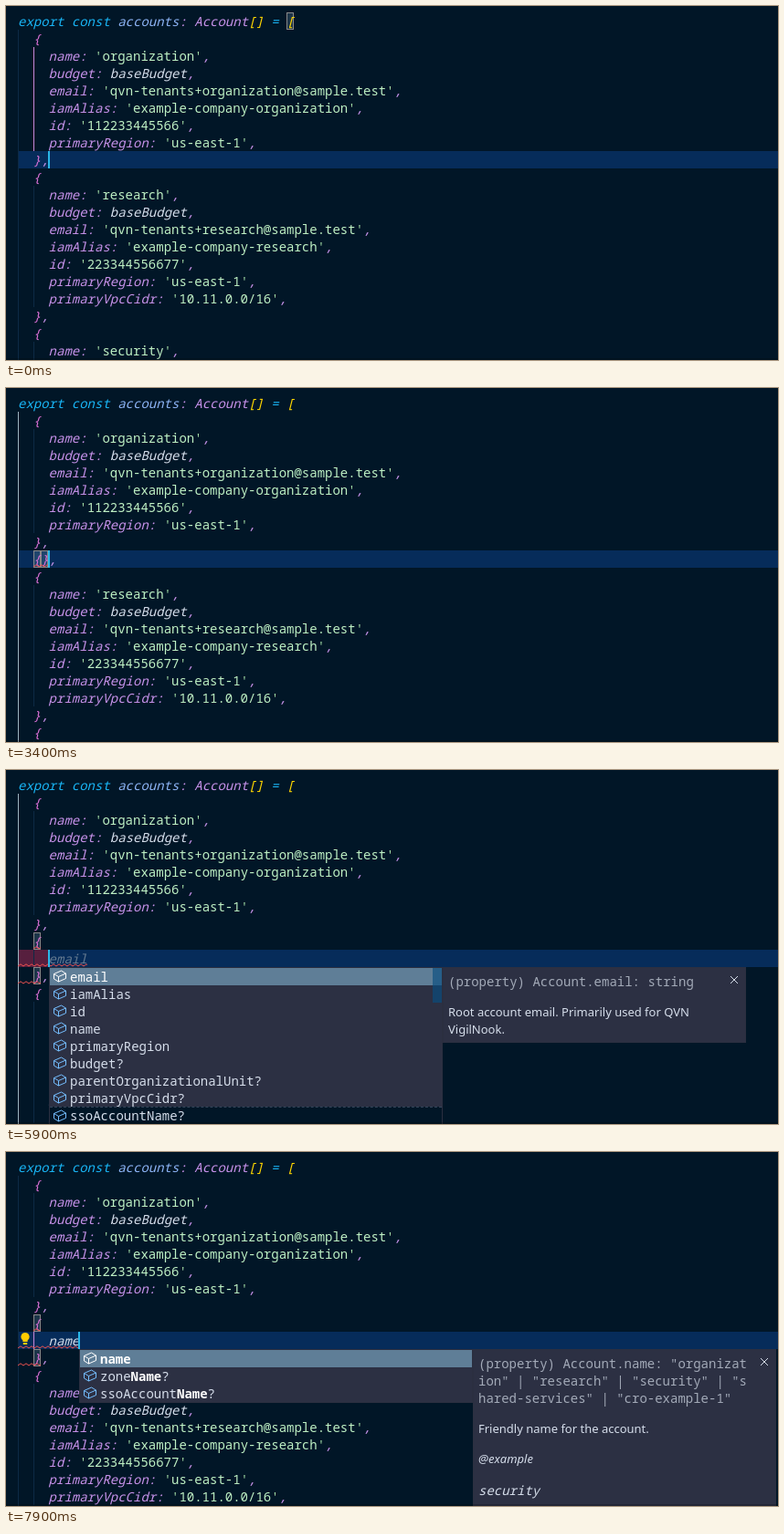
Animation, 845 px wide and 388 px high, one loop 8000 ms. Source, as an HTML page:

```html
<!DOCTYPE html>
<html lang="en">
<head>
<meta charset="utf-8">
<title>Editor completion</title>
<style>
html, body { margin: 0; width: 100%; height: 100%; overflow: hidden; background: #011627; }
#stage { position: relative; width: 845px; height: 388px; overflow: hidden;
  font: 14px/19px "Noto Sans Mono", monospace; color: #d6deeb; }
#stage div, #stage svg { position: absolute; box-sizing: border-box; }
.line { white-space: pre; left: 13px; height: 19px; }
i { font-style: italic; }
.key { color: #c792ea; }
.str { color: #bff0c4; }
.quote { color: #a5dfa8; }
.brace { color: #da70d6; }
.gold { color: #ffd700; }
.kw { color: #19b5f5; }
.var { color: #8db4f5; }
.ghost { color: #62788f; }
.current { left: 13px; right: 0; height: 19px; background: #062c5a; }
.space { left: 13px; height: 19px; background: #571f3e; }
.guide { width: 1px; background: #0d2a45; }
.match { width: 8px; height: 19px; background: #5f7e974d; border: 1px solid #888; }
.caret { width: 2px; height: 19px; background: #2ab7e8; }
.wave { height: 4px; fill: none; stroke: #ef5350; }
.popup { top: 216px; width: 431px; background: #2c3043; border: 1px solid #2b2f40; overflow: hidden; }
.row { left: 0; right: 0; height: 19px; padding-left: 22px; white-space: pre; }
.row.on { background: #5f7e97; color: #fff; }
.row.out { background: #011627; border-top: 1px dashed #33455a; line-height: 18px; }
.row b { color: #fff; }
.row svg { left: 3px; top: 1px; fill: none; stroke: #75beff; }
.row.on svg, .row svg.snip { stroke: #fff; }
.row small { position: absolute; right: 9px; font-size: 12px; color: #7fa3bd; }
.slider { right: 0; top: 0; width: 10px; height: 38px; background: #084d81; }
.docs { top: 216px; width: 332px; background: #2c3043; border: 1px solid #2b2f40; overflow: hidden; }
.docs p { margin: 14.5px 0 0 5px; width: 299px; font: 13px/19px "Noto Sans", sans-serif; white-space: nowrap; }
.docs p.sig, .docs p.code { font: 14px/19px "Noto Sans Mono", monospace; }
.docs p.sig { margin-top: 5px; white-space: normal; word-break: break-all; color: #a3aab8; }
.docs svg { right: 7px; top: 8px; stroke: #d6deeb; }
.docs .slanted { font-style: italic !important; }
.edge { left: 0; right: 0; bottom: 0; height: 2px; background: #0003; }
</style>
</head>
<body>
<div id="stage"></div>
<script>
const stage = document.getElementById('stage');
const LOOP = 8000, ROW = 19, CHAR = 8.4;
const x = col => 13 + CHAR * col;
const y = line => 7 + ROW * line;

const entry = (name, id, extra = []) => [
  '  {',
  `    name: '${name}',`,
  '    budget: baseBudget,',
  `    email: 'qvn-tenants+${name}@sample.test',`,
  `    iamAlias: 'example-company-${name}',`,
  `    id: '${id}',`,
  "    primaryRegion: 'us-east-1',",
  ...extra,
  '  },'
];
const head = ['', ...entry('organization', '112233445566')];
const tail = [
  ...entry('research', '223344556677', ["    primaryVpcCidr: '10.11.0.0/16',"]),
  ...entry('security', '')
];
const title = '<i><span class="kw">export const</span> <span class="var">accounts</span>' +
  '<span class="key">:</span> <span class="key">Account</span><span class="gold">[]</span> ' +
  '<span class="kw">=</span> <span class="gold">[</span></i>';

const paint = text => text.replace(/'([^']*)'|\w+:|[{}]|,|\w+/g, (m, str) => {
  if (str !== undefined) return `<span class="quote">'</span><span class="str">${str}</span><span class="quote">'</span>`;
  const kind = /[{}]/.test(m) ? 'brace' : /[:,]$/.test(m) ? 'key' : '';
  return `<i class="${kind}">${m}</i>`;
});

const box = (cls, style, body = '') => `<div class="${cls}" style="${style}">${body}</div>`;

function wave([line, from, to]) {
  const left = Math.round(x(from)), width = Math.round(x(to)) - left;
  let d = 'M0 3';
  for (let k = 1; k * 3 <= width + 3; k++) d += `L${k * 3} ${k % 2 ? 0.8 : 3}`;
  return `<svg class="wave" width="${width}" style="left:${left}px;top:${y(line) + 15}px"><path d="${d}"/></svg>`;
}

const cube = '<svg width="16" height="16"><path d="M1.5 5.5L9.5 2L14.5 5V10.5L6.5 14L1.5 11ZM1.5 5.5L6.5 8.5L14.5 5M6.5 8.5V14"/></svg>';
const snippet = '<svg class="snip" width="16" height="16"><path d="M2.5 13V2.5H14.5V13"/><path d="M2.5 14.5H15" stroke-dasharray="2 1"/></svg>';

const fields = ['email', 'iamAlias', 'id', 'name', 'primaryRegion', 'budget?',
  'parentOrganizationalUnit?', 'primaryVpcCidr?', 'ssoAccountName?'];

function popup(s, left) {
  const typed = s.typed;
  let items = fields;
  if (typed) {
    items = ['name', 'zoneName?', 'ssoAccountName?'];
    if (typed === 'n') items = [...items, 'new', 'newpromise'];
  }
  const notes = { new: 'New Statement', newpromise: 'new Promise' };
  const rows = items.map((item, k) => {
    // Capital match wins, so "zoneName" highlights its last word
    const cap = typed ? typed[0].toUpperCase() + typed.slice(1) : '';
    let at = typed ? item.indexOf(cap) : -1;
    if (typed && at < 0) at = item.indexOf(typed);
    const end = at + (typed || '').length;
    const label = at < 0 ? item : `${item.slice(0, at)}<b>${item.slice(at, end)}</b>${item.slice(end)}`;
    const note = notes[item] ? `<small>${notes[item]}</small>` : '';
    return box('row' + (k ? '' : ' on') + (k === 8 ? ' out' : ''), `top:${k * ROW}px`,
      (note ? snippet : cube) + label + note);
  }).join('');
  const slider = typed ? '' : box('slider', `opacity:${s.docs ? 0.65 : 0.2}`);
  return box('popup', `left:${left}px;height:${items.length * ROW + 2}px`, rows + slider);
}

function docs(s, left) {
  const close = '<svg width="10" height="10"><path d="M1 1L9 9M9 1L1 9"/></svg>';
  const body = s.typed
    ? '<p class="sig">(property) Account.name: "organization" | "research" | "security" | "shared-services" | "cro-example-1"</p>' +
      '<p>Friendly name for the account.</p><p class="slanted">@example</p><p class="code slanted">security</p>'
    : '<p class="sig">(property) Account.email: string</p>' +
      '<p>Root account email. Primarily used for QVN<br>VigilNook.</p>';
  return box('docs', `left:${left + 431}px;height:${s.typed ? 180 : 83}px`, body + close);
}

const bulb = '<svg width="14" height="14" style="left:14px;top:198px"><path fill="#fc0" ' +
  'd="M7 0A4.6 4.6 0 0 0 4.4 8.4V10H9.6V8.4A4.6 4.6 0 0 0 7 0ZM4.8 11H9.2V13H4.8Z"/></svg>';

function draw(s) {
  const lines = [...head, ...s.added, ...tail].slice(0, 21);
  const [row, col] = s.at;
  let html = box('current', `top:${y(row)}px`);
  if (s.space) html += box('space', `top:${y(row)}px;width:${Math.round(CHAR * s.space)}px`);

  const guide = (c, from, to, color) => box('guide',
    `left:${Math.round(x(c))}px;top:${y(from)}px;height:${(to - from) * ROW}px;` + (color ? `background:${color}` : ''));
  html += guide(0, 1, 21);
  lines.forEach((text, n) => { if (text.startsWith('    ')) html += guide(2, n, n + 1); });
  html += guide(...s.active, s.active[0] ? '#c987d8' : '#9fb3c0');

  for (const [n, c] of s.match) html += box('match', `left:${Math.round(x(c))}px;top:${y(n)}px`);
  lines.forEach((text, n) => {
    let code = n ? paint(text) : title;
    if (n === row && s.ghost) code += `<i class="ghost">${s.ghost}</i>`;
    html += box('line', `top:${y(n)}px`, code);
  });
  html += s.waves.map(wave).join('');
  if (s.bulb) html += bulb;
  if (s.caret) html += box('caret', `left:${Math.floor(x(col) - 0.6)}px;top:${y(row)}px`);
  const left = Math.round(x(col));
  if (s.list) html += popup(s, left);
  if (s.docs) html += docs(s, left);
  stage.innerHTML = html + box('edge', '');
}

const on = { caret: true }, off = { caret: false };
const open = [[0, 35]], pair = [[9, 2], [9, 3]], block = [[9, 2], [11, 2]];
const inner = end => [[9, 2, 3], [10, 0, end], [11, 0, 3]];
const type = (typed, more) => ({
  typed, added: ['  {', '    ' + typed, '  },'], at: [10, 4 + typed.length],
  ghost: 'name'.slice(typed.length), space: 0, active: [2, 10, 11], waves: inner(8), ...on, ...more
});

// Each step changes only the listed parts of the state
const steps = [
  [0, { added: [], at: [8, 4], match: open, active: [2, 2, 8], waves: [], space: 0,
        ghost: '', typed: '', list: false, docs: false, bulb: false, ...on }],
  [400, { added: ['  '], at: [9, 2], active: [0, 1, 21], space: 2 }],
  [500, { waves: [[9, 0, 2]] }],
  [900, off], [1400, on], [1900, off],
  [2000, { added: ['  {}'], at: [9, 3], match: pair, space: 0, waves: [[10, 2, 3]], ...on }],
  [2400, { waves: [[9, 2, 4], [10, 2, 3]] }],
  [2800, { at: [9, 4] }],
  [3000, { added: ['  {},'], at: [9, 5], match: open }],
  [3100, { waves: [[9, 2, 4]] }],
  [3400, { at: [9, 4], match: pair }],
  [3600, { at: [9, 3] }],
  [3900, { added: ['  {', '    ', '  },'], at: [10, 4], match: block, space: 4, waves: inner(4).slice(0, 2) }],
  [4300, { waves: inner(4) }],
  [4400, off], [4900, on],
  [5000, { list: true, ghost: 'email', waves: inner(9) }],
  [5100, { docs: true }],
  [5400, off], [5900, on],
  [6400, type('n', { docs: false })],
  [6500, { docs: true }],
  [6600, type('na')],
  [6800, type('nam')],
  [6900, type('name')],
  [7400, off],
  [7600, { bulb: true }],
  [7900, on]
];
let state = {};
const states = steps.map(([, change]) => state = { ...state, ...change });

let shown = -1;
function tick() {
  const t = performance.now() % LOOP;
  let k = steps.length - 1;
  while (steps[k][0] > t) k--;
  if (k !== shown) draw(states[shown = k]);
  requestAnimationFrame(tick);
}
tick();
</script>
</body>
</html>
```
